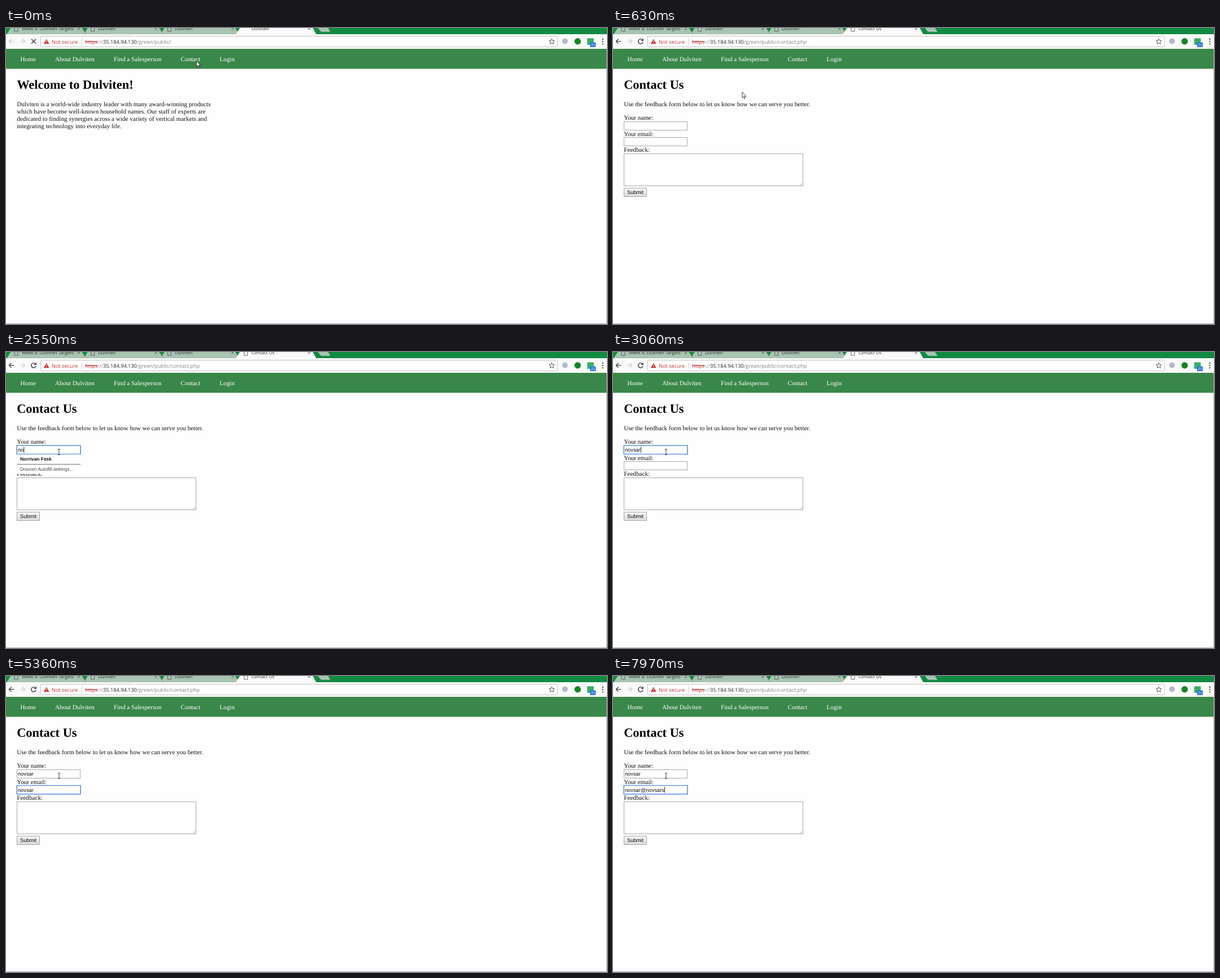
These frames come from a looping animation (1065x526 px, 8 s). An HTML page:

```html
<!DOCTYPE html>
<html lang="en">
<head>
<meta charset="utf-8">
<title>Contact form</title>
<style>
  html, body { margin: 0; width: 100%; height: 100%; overflow: hidden; background: #fefefe; }
  svg { display: block; width: 1065px; height: 526px; }
  text { text-rendering: geometricPrecision; white-space: pre; }
  .serif { font: 11.2px "Liberation Serif", "Times New Roman", serif; fill: #111; }
  .nav { fill: #fff; }
  .h1 { font-size: 22.4px; font-weight: bold; fill: #000; }
  .ui { font: 9.2px "Open Sans", "Noto Sans", sans-serif; }
  .tab { font-size: 8.05px; fill: #2c352f; }
  .sans { font: 9.33px "Liberation Sans", Arial, sans-serif; fill: #111; }
  .small { font-size: 8.4px; }
  .crisp { shape-rendering: crispEdges; }
  .line { fill: none; stroke: #3c3c3c; stroke-width: 1.4; }
  .box { fill: #fff; stroke: #a9a9a9; }
  .focus { fill: none; stroke: #4a8fe4; stroke-width: 1.3; }
</style>
</head>
<body>
<svg viewBox="0 0 1065 526">
  <defs>
    <linearGradient id="face" x2="0" y2="1">
      <stop stop-color="#f6f6f6"/><stop offset="1" stop-color="#dcdcdc"/>
    </linearGradient>
    <path id="doc" d="M.5-2V6H6.5V-2" fill="none" stroke="#555" stroke-width=".9"/>
    <path id="shut" d="M-2-2 2 2M-2 2 2-2" stroke="#4a4f4b" stroke-width=".9"/>
    <path id="back" d="M9.3 0H.8M4.8-4.2.6 0 4.8 4.2" fill="none" stroke-width="1.3"/>
  </defs>

  <!-- tab strip -->
  <rect width="1065" height="11" fill="#118a42"/>
  <g fill="#a9c4b2" stroke="#5f8f70" stroke-width=".6">
    <path d="M274 11.3 281-1H406L413 11.3Z"/>
    <path d="M138 11.3 145-1H271L279 11.3Z"/>
    <path d="M1 11.3 9-1H134L142 11.3Z"/>
    <path d="M552-1 557 5.5Q558 7 560 7H573Q575 7 574 5L570-1Z"/>
  </g>
  <rect y="11" width="1065" height="26" fill="#fafafa"/>
  <path d="M407 11.5 415-1H543L550 11.5Z" fill="#fafafa"/>
  <g class="ui">
    <text class="tab" x="28" y="4.3">Week 8: Dulviten Targets</text>
    <text class="tab" x="163" y="4.3">Dulviten</text>
    <text class="tab" x="299" y="4.3">Dulviten</text>
    <text class="tab" x="435" y="4.3" id="title"></text>
  </g>
  <use href="#doc" x="14.5"/><use href="#doc" x="150"/><use href="#doc" x="286"/>
  <use href="#doc" x="421.5" id="icon"/>
  <use href="#shut" x="129" y="1.5"/><use href="#shut" x="265.5" y="1.5"/>
  <use href="#shut" x="401.5" y="1.5"/><use href="#shut" x="537" y="1.5"/>

  <!-- toolbar -->
  <use href="#back" x="4.8" y="23.7" id="prev"/>
  <use href="#back" transform="translate(34.2 23.7) scale(-1 1)" stroke="#cfcfcf"/>
  <path id="stop" class="line" d="M45 19.7 53 27.7M45 27.7 53 19.7"/>
  <g id="reload">
    <path class="line" d="M52.2 21.2A4.2 4.2 0 1 0 53 25"/>
    <path d="M53.8 18.6V23H49.4Z" fill="#3c3c3c"/>
  </g>
  <rect x="61.5" y="14.5" width="915.5" height="19" rx="1.5" fill="#fff" stroke="#c2c2c2"/>
  <path d="M71.7 19.4 76.6 28.2H66.8Z" fill="#c5302b"/>
  <path d="M71.7 22.3V25.2M71.7 26V27" stroke="#fff" stroke-width="1"/>
  <path class="crisp" d="M134.5 18.5V30" stroke="#c9c9c9"/>
  <g class="ui">
    <text x="81" y="27.6" fill="#c5302b">Not secure</text>
    <text x="140" y="27.6" fill="#c5302b">https</text>
    <text x="163.3" y="27.6" fill="#888">://</text>
    <text x="172" y="27.6" fill="#222">35.184.94.130</text>
    <text x="232" y="27.6" fill="#808080" id="path"></text>
  </g>
  <path d="M140 24.5H163.5" stroke="#c5302b" stroke-width=".9"/>
  <path d="M967.2 19.2 968.6 22.4 972 22.7 969.4 25 970.2 28.4 967.2 26.6 964.2 28.4 965 25 962.4 22.7 965.8 22.4Z" fill="none" stroke="#4b4b4b" stroke-width=".95"/>
  <circle cx="990.5" cy="23.5" r="5" fill="#b3bac8"/>
  <circle cx="1013" cy="23.8" r="5.7" fill="#138521"/>
  <rect x="1030" y="18.3" width="11.5" height="11.5" fill="#36b065"/>
  <rect x="1035" y="25.5" width="10" height="8.5" rx="1" fill="#2474dc"/>
  <text class="sans" x="1036.7" y="32.2" style="font-size:6.4px;fill:#fff">21</text>
  <g fill="#444"><circle cx="1057.5" cy="19.7" r="1.2"/><circle cx="1057.5" cy="23.9" r="1.2"/><circle cx="1057.5" cy="28.1" r="1.2"/></g>

  <!-- page -->
  <rect y="37" width="1065" height="35.5" fill="#398749"/>
  <g class="serif">
    <text class="nav" x="25.5" y="59.3">Home</text>
    <text class="nav" x="87" y="59.3">About Dulviten</text>
    <text class="nav" x="191" y="59.3">Find a Salesperson</text>
    <text class="nav" x="309.6" y="59.3">Contact</text>
    <text class="nav" x="378.5" y="59.3">Login</text>
  </g>
  <path class="crisp" d="M1064.5 37V526M0 525.5H1065" stroke="#b0b0b0"/>

  <g id="welcome" class="serif">
    <text class="h1" x="19.2" y="108">Welcome to Dulviten!</text>
    <text x="19.2" y="139">Dulviten is a world-wide industry leader with many award-winning products</text>
    <text x="19.2" y="152">which have become well-known household names. Our staff of experts are</text>
    <text x="19.2" y="165">dedicated to finding synergies across a wide variety of vertical markets and</text>
    <text x="19.2" y="178">integrating technology into everyday life.</text>
  </g>

  <g id="contact">
    <g class="serif">
      <text class="h1" x="19.2" y="108">Contact Us</text>
      <text x="19.2" y="139">Use the feedback form below to let us know how we can serve you better.</text>
      <text x="19.2" y="163.2">Your name:</text>
      <text x="19.2" y="191.8">Your email:</text>
      <text x="19.2" y="220.3">Feedback:</text>
    </g>
    <rect class="box crisp" x="19.5" y="166.5" width="112" height="15"/>
    <rect class="box crisp" x="19.5" y="194.5" width="112" height="15"/>
    <rect class="box crisp" x="19.5" y="223.5" width="317" height="57"/>
    <path d="M331.5 279.5 335.5 275.5M334 279.5 335.5 278" stroke="#888" stroke-width=".7"/>
    <rect class="crisp" x="19.5" y="284.5" width="40" height="15" fill="url(#face)" stroke="#a6a6a6"/>
    <text class="sans" x="25" y="295.2">Submit</text>
    <rect id="ring" class="focus" x="19.1" width="113" height="15.3"/>
    <text id="name" class="sans" x="20.9" y="177.2"></text>
    <text id="mail" class="sans" x="20.9" y="205.6"></text>
    <rect id="caret" width=".9" height="10.5" fill="#111"/>
    <g id="fill">
      <rect x="18.5" y="182" width="114" height="34.6" fill="#fff"/>
      <path class="crisp" d="M19 199.5H132" stroke="#6c6c6c"/>
      <text class="sans small" x="25" y="193" font-weight="bold" style="font-weight:bold">Norrivan Fesk</text>
      <text class="sans small" x="25" y="211" style="fill:#444">Dravom Autofill settings...</text>
    </g>
  </g>

  <path id="arrow" d="M.5.4V10.6L2.8 8.5 4.3 12 5.9 11.3 4.4 7.9H7.5Z" fill="#fff" stroke="#111" stroke-width=".8"/>
  <path id="beam" d="M-2 .5H-.6L0 1 .6.5H2M0 1V10M-2 10.5H-.6L0 10 .6 10.5H2" fill="none" stroke="#222" stroke-width=".9"/>
</svg>
<script>
const LOOP = 8000;
const $ = id => document.getElementById(id);
const USER = "novsar", MAIL = USER + "@" + USER + "s";

// Each step changes some of the state: pointer, page load, focus, typed letters, caret.
const steps = [
  [0, { arrow: [337, 58], beam: null, moved: false, loaded: false, form: false,
        focus: null, name: 0, mail: 0, caret: false, fill: false }],
  [310, { moved: true, arrow: [325, 60] }],
  [490, { loaded: true, arrow: [270, 102] }],
  [630, { form: true, arrow: [228.5, 113.5] }],
  [770, { arrow: [205, 126] }],
  [920, { arrow: [140, 165] }],
  [1040, { arrow: null, beam: [94, 191.5] }],
  [1190, { beam: [94, 188.5] }],
  [1340, { beam: [94, 172] }],
  [1620, { focus: "name", caret: true }],
  [2140, { caret: false }],
  [2550, { name: 2, caret: true, fill: true }],
  [2820, { name: 3, fill: false }],
  [2940, { name: 5 }],
  [3060, { name: 6 }],
  [3610, { focus: "mail" }],
  [4010, { caret: false }],
  [4280, { mail: 2, caret: true }],
  [4530, { mail: 3 }],
  [4680, { mail: 4 }],
  [4800, { mail: 6 }],
  [5360, { caret: false }],
  [5630, { mail: 7, caret: true }],
  [6040, { mail: 8 }],
  [6180, { mail: 9 }],
  [6340, { mail: 10 }],
  [6460, { mail: 11 }],
  [6580, { mail: 12 }],
  [6720, { mail: 13 }],
  [6850, { mail: 14 }],
  [7400, { caret: false }],
  [7970, { caret: true }]
];

const show = (id, on) => $(id).setAttribute("visibility", on ? "visible" : "hidden");
const toggle = (id, on) => { $(id).style.display = on ? "" : "none"; };

function place(id, at) {
  show(id, at);
  if (at) $(id).setAttribute("transform", `translate(${at})`);
}

function draw(s) {
  place("arrow", s.arrow);
  place("beam", s.beam);
  $("title").textContent = s.moved ? "Contact Us" : "Dulviten";
  $("path").textContent = "/green/public/" + (s.moved ? "contact.php" : "");
  $("prev").setAttribute("stroke", s.moved ? "#3c3c3c" : "#cfcfcf");
  toggle("icon", s.loaded);
  toggle("reload", s.loaded);
  toggle("stop", !s.loaded);
  toggle("welcome", !s.form);
  toggle("contact", s.form);
  toggle("fill", s.fill);
  $("name").textContent = USER.slice(0, s.name);
  $("mail").textContent = MAIL.slice(0, s.mail);
  show("ring", s.focus);
  show("caret", s.focus && s.caret);
  if (s.focus) {
    const top = s.focus === "name" ? 166.2 : 194.6;
    const width = s[s.focus] ? $(s.focus).getComputedTextLength() : 0;
    $("ring").setAttribute("y", top);
    $("caret").setAttribute("x", 21 + width);
    $("caret").setAttribute("y", top + 2.3);
  }
}

let last = -1;
function tick() {
  const t = performance.now() % LOOP;
  const count = steps.filter(([at]) => at <= t).length;
  if (count !== last) {
    last = count;
    draw(Object.assign({}, ...steps.slice(0, count).map(step => step[1])));
  }
  requestAnimationFrame(tick);
}
tick();
</script>
</body>
</html>
```
